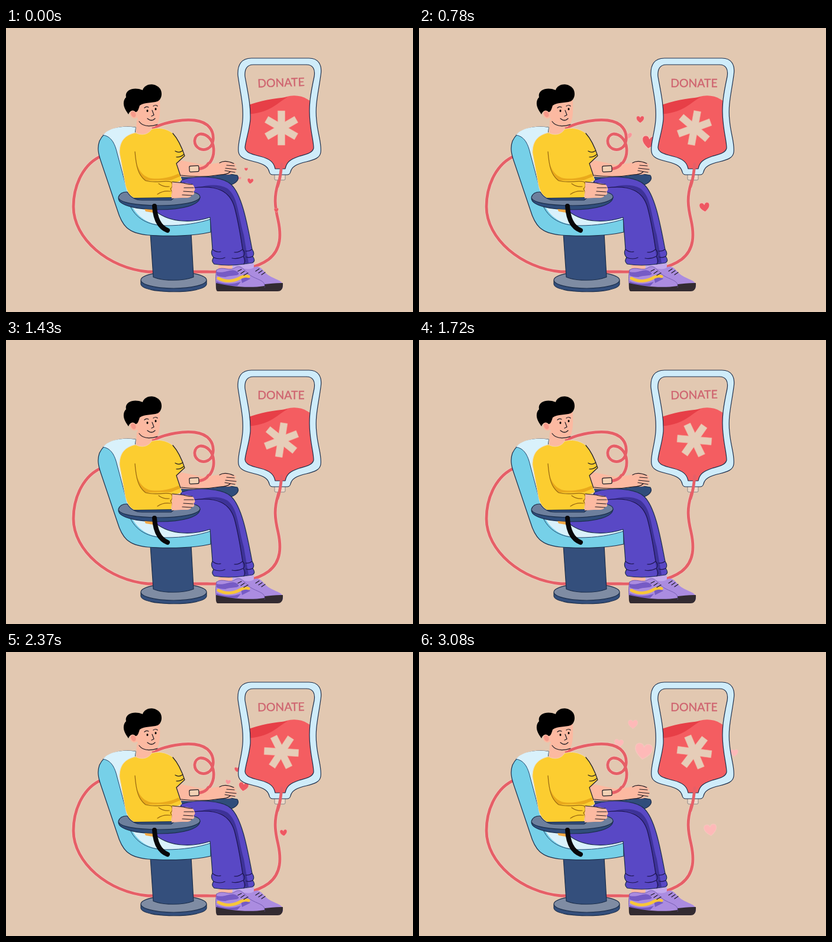
Write an HTML page that moves like this. It is 688 by 480 pixels and loops after 3130 ms.

```html
<!DOCTYPE html>
<html lang="en">
<head>
<meta charset="utf-8">
<title>Blood donation</title>
<style>
html, body { margin: 0; width: 100%; height: 100%; overflow: hidden; background: #e2c8b1; }
svg { display: block; width: 688px; height: 480px; }
path, ellipse, rect { stroke-linecap: round; stroke-linejoin: round; }
.ink { stroke: #1c2f4c; stroke-width: 1.2; }
.line { fill: none; stroke: #1b1a22; stroke-width: 1.2; }
.seam { fill: none; stroke: #94640f; stroke-width: 1.2; }
.fold { fill: none; stroke: #1d1650; stroke-width: 1.2; }
.skin { fill: #fcb9a1; }
.halo { fill: none; stroke: #efd0c2; stroke-width: 6.4; }
.tube { fill: none; stroke: #e65f67; stroke-width: 4.8; }
text { font: 19.4px Lato, "Open Sans", sans-serif; fill: #cf6570; stroke: #cf6570; stroke-width: .4; }
</style>
</head>
<body>
<svg viewBox="0 0 688 480">
  <defs>
    <path id="hose" d="M162 216C133 228 114 263 114 302C114 356 173 406 240 412H340C375 413 418 410 444 391C466 374 465 348 460 325C454 300 453 285 460 262L466 236"/>
    <path id="line" d="M246 170C274 157 302 154 319 156C343 159 352 174 350 190C348 204 336 208 327 204C315 197 317 181 329 179C340 179 350 189 351 204C352 220 344 235 327 238"/>
    <path id="heart" d="M0 9C-6 5-10 1-10-4C-10-10-2-11 0-5C2-11 10-10 10-4C10 1 6 5 0 9Z"/>
    <path id="bag" d="M418 62H508C519 62 523 70 521 82C515 110 511 132 514 158C516 180 520 192 520 203C518 212 505 214 495 217C480 222 474 227 472 238H455C453 227 446 221 430 217C415 213 405 211 404 202C405 190 411 175 413 155C414 130 408 105 404 82C403 70 407 62 418 62Z"/>
    <clipPath id="inside"><use href="#bag"/></clipPath>
    <path id="shoe" d="M356 409C366 401 378 413 389 404C398 401 402 408 409 415C419 424 434 425 437 433V439H356C354 429 354 417 356 409Z"/>
  </defs>

  <use href="#hose" class="halo"/><use href="#hose" class="tube"/>
  <g id="hearts"></g>

  <!-- bag -->
  <rect x="454" y="243" width="18" height="14" rx="2" fill="#ead9ca" stroke="#8a8585"/>
  <path class="ink" fill="#cfecfa" d="M415 51H512C528 51 535 62 532 80C528 110 522 130 525 156C527 180 534 195 532 210C531 220 520 223 508 226C490 230 483 235 481 243Q480 248 475 248H451Q446 248 445 243C443 235 437 230 420 226C404 222 394 219 393 209C391 195 398 180 400 156C402 130 396 110 392 80C391 62 398 51 415 51Z"/>
  <use href="#bag" fill="#e2c8b1"/>
  <g clip-path="url(#inside)">
    <path fill="#f45d61" d="M400 136C428 130 446 130 462 121C478 112 498 112 512 122L530 130V240H400Z"/>
    <path fill="#e73f47" d="M400 134C430 122 452 119 476 117C460 124 448 146 400 146Z"/>
  </g>
  <use href="#bag" class="ink" fill="none"/>
  <path class="tube" d="M466 230C465 242 464 254 459 268"/>
  <g id="star" fill="#e6cdb8" stroke="#f6ae9f" stroke-width=".6">
    <path d="M-6-29H6V-10.4L22.1-19.7L28.1-9.3L12 0L28.1 9.3L22.1 19.7L6 10.4V29H-6V10.4L-22.1 19.7L-28.1 9.3L-12 0L-28.1-9.3L-22.1-19.7L-6-10.4Z"/>
  </g>
  <text id="label" x="465" y="100" text-anchor="middle">DONATE</text>

  <!-- chair -->
  <path class="ink" fill="#344f7c" d="M228 427V433C231 450 336 450 339 433V427Z"/>
  <ellipse class="ink" fill="#7f8ca3" cx="283.5" cy="426" rx="55.5" ry="14"/>
  <path class="ink" fill="#344f7c" d="M244 347L249 421C266 428 299 428 317 421L313 347Z"/>
  <path class="ink" fill="#76d0e8" d="M219 168C190 164 166 173 158 191C154 202 156 212 160 224L188 307C196 334 206 347 240 350C280 353 320 351 346 345V310L250 290L215 210Z"/>
  <path fill="#d9f1fb" d="M219 168C195 164 172 170 164 181C178 183 184 195 188 212L205 278C213 315 235 332 270 334C300 334 325 330 346 323V300L230 280L215 200Z"/>
  <path fill="none" stroke="#24466d" d="M164 181C178 183 184 195 188 212L203 268M210 301C222 327 248 334 270 334C300 334 325 330 346 323"/>

  <!-- far arm -->
  <path class="ink" fill="#304d7b" d="M296 252C325 243 372 245 391 249C396 256 388 264 376 266C350 268 320 268 296 262Z"/>
  <use href="#line" class="halo"/><use href="#line" class="tube"/>
  <path class="skin" d="M288 222L332 231C348 230 361 228 367 225C374 224 379 226 385 228C391 231 390 234 384 233C391 236 393 239 387 239C391 243 389 246 383 244C382 250 370 247 362 248C342 252 320 253 292 251Z"/>
  <path class="line" d="M296 249C320 252 345 251 362 248C371 248 376 246 379 243M361 228C369 223 378 226 385 229M373 232L386 233M371 237L389 239M370 241L387 244"/>
  <path class="tube" d="M342 229C339 234 334 237 327 238"/>
  <rect class="line" x="310" y="233" width="16" height="10" rx="2" style="fill:#f2d1b4" transform="rotate(-3 318 238)"/>

  <!-- legs and shoes -->
  <path class="skin" d="M359 396H382V410H359Z"/>
  <path fill="#c3a9ec" d="M383 396H419V411H383Z"/>
  <g transform="translate(31)">
    <use href="#shoe" fill="#ab8ce0"/>
    <path fill="#332b31" d="M356 434C383 439 413 430 437 431Q438 445 428 445H356Z"/>
    <path class="line" stroke-width="2" d="M391 411L397 407M396 414L402 410M401 417L407 413"/>
  </g>
  <use href="#shoe" fill="#ab8ce0" stroke="#6a52a8" stroke-width=".8"/>
  <path fill="#765bc5" d="M356 412C371 416 381 404 391 412C400 420 382 417 371 421C364 421 359 420 356 418ZM397 421C406 418 410 421 413 424L399 431Z"/>
  <path fill="none" stroke="#f7c63a" stroke-width="5" d="M359 423C373 431 388 427 398 421Q405 418 410 420"/>
  <path fill="#765bc5" d="M356 428C370 434 384 433 397 429L391 436H356Z"/>
  <path fill="#332b31" d="M355 431C380 437 410 440 437 436Q438 445 429 445H358Q354 445 355 431Z"/>
  <path class="line" stroke-width="2" d="M392 411L398 408M397 415L403 411M402 418L409 414"/>
  <path fill="#5948c5" class="ink" d="M297 257C322 248 366 251 380 264C398 280 407 326 416 374Q421 381 417 386Q423 394 416 397L402 399Q376 403 352 399Q346 394 351 388Q345 381 349 374L345 320C318 329 277 331 251 308L285 285Z"/>
  <path fill="#3d3298" d="M325 270C361 265 378 276 386 302C392 324 398 360 403 398L410 397L402 350C391 309 392 285 374 271C360 264 343 264 325 270Z"/>
  <path class="fold" d="M317 270C358 265 378 276 386 302C392 324 397 354 400 374Q406 381 401 386Q406 393 402 399M349 374Q356 380 363 378M351 388Q362 392 370 388M400 374Q393 380 386 379M401 386Q392 391 382 389M416 374Q411 378 405 377M417 386Q411 389 406 387"/>

  <!-- body -->
  <path class="skin" d="M221 155L220 181C229 186 242 184 248 176L245 160Z"/>
  <path fill="#fccd30" stroke="#f3d7a7" d="M219 177C201 181 192 191 192 211L202 265C205 280 213 289 228 291L279 291L282 264L297 257L288 229L302 216C296 200 291 187 282 178C270 169 258 168 246 171C240 181 228 182 219 177Z"/>
  <path fill="#e9a91c" d="M222 232C225 246 229 254 237 258L279 257L294 251L292 246C278 253 255 257 241 253C231 249 226 242 222 232Z"/>
  <path class="seam" d="M218 209C220 235 224 249 236 258C252 263 268 257 279 260Q284 266 278 272Q284 280 279 291M258 263Q266 269 276 268M256 281Q266 274 278 276"/>
  <path class="line" d="M282 178C291 188 297 201 302 216L288 229L295 250M286 208Q293 212 299 207M288 218Q294 219 300 214"/>

  <!-- near armrest -->
  <path class="ink" fill="#304d7b" d="M190 288C191 301 224 307 259 307C299 307 327 299 328 286Z"/>
  <path class="ink" fill="#6d7f9d" d="M190 286C192 279 199 277 205 277C211 287 219 291 230 291H279L297 277H312C322 278 328 281 328 286C325 295 294 300 259 300C221 300 190 295 190 286Z"/>
  <path class="skin" d="M281 260L300 262C308 262 319 264 318 269C320 272 320 275 317 276C320 280 317 283 314 282C313 288 304 287 296 287L280 288Z"/>
  <path class="line" d="M281 260L300 262Q310 265 315 264M301 270L317 270M300 276L316 277M298 282L314 283"/>
  <path fill="#f3a945" d="M234 306L248 307V312L236 310Z"/>
  <path fill="none" stroke="#080709" stroke-width="8" d="M251 301C252 320 258 336 273 342"/>

  <!-- head -->
  <path class="skin" d="M219 132C213 136 208 141 210 148C213 154 219 154 222 151C224 165 239 171 251 167C260 161 261 145 260 122L235 121Z"/>
  <path fill="#f69a8b" d="M211 143Q215 138 219 144Q221 150 216 151Q211 149 211 143Z"/>
  <path d="M203 140C197 130 198 122 203 117C200 104 217 99 231 105C234 95 248 93 255 98C266 103 265 120 256 124C247 127 235 125 226 131C224 137 223 142 219 142C215 137 209 140 207 146Z"/>
  <path class="line" d="M225 158C230 165 240 168 256 163M247 139Q249 144 250 147L246 149M239 153Q246 159 252 153M234 135Q237 132 241 134M249 132Q253 129 256 132"/>
  <ellipse cx="239" cy="140" rx="1.5" ry="2.1"/><ellipse cx="253" cy="137" rx="1.5" ry="2.1"/>
</svg>
<script>
const LOOP = 3130, CYCLE = 2000;
const $ = id => document.getElementById(id);
const clamp = v => Math.max(0, Math.min(1, v));

// start x, y; speed x, y in px/ms; full width; tilt; paleness
const hearts = [
  [406, 239, -.041, -.108, 16, 0, 0],
  [413, 259, -.031, -.084, 29, 8, 0],
  [395, 254, -.053, -.092, 15, 8, .65],
  [457, 308, .033, -.0065, 21, -7, 0],
  [468, 230, .06, -.055, 13, 0, .3]
].map(spec => {
  const el = document.createElementNS("http://www.w3.org/2000/svg", "use");
  el.setAttribute("href", "#heart");
  el.setAttribute("stroke", "#f5c7bd");
  $("hearts").append(el);
  return { el, spec };
});

const tint = p => `rgb(${238 + 16 * p},${88 + 97 * p},${98 + 86 * p})`;

function draw(t) {
  const age = t > 1600 ? t - CYCLE : t;
  const fade = clamp((age - 800) / 280);
  const alpha = clamp((1280 - age) / 180);
  for (const { el, spec: [x, y, vx, vy, width, tilt, pale] } of hearts) {
    const size = width / 20 * (age + 600) / 1680 * clamp((age + 200) / 200);
    el.setAttribute("transform", `translate(${x + vx * age} ${y + vy * age}) rotate(${tilt}) scale(${size})`);
    el.setAttribute("fill", tint(Math.max(pale, fade)));
    el.setAttribute("opacity", alpha);
  }
  $("star").setAttribute("transform", `translate(465.5 169) rotate(${t * .09})`);
  const lean = -2 * Math.max(0, Math.cos(t / CYCLE * 2 * Math.PI));
  $("label").setAttribute("transform", `rotate(${lean} 440 94)`);
}

function tick() {
  draw(performance.now() % LOOP);
  requestAnimationFrame(tick);
}
tick();
</script>
</body>
</html>
```
